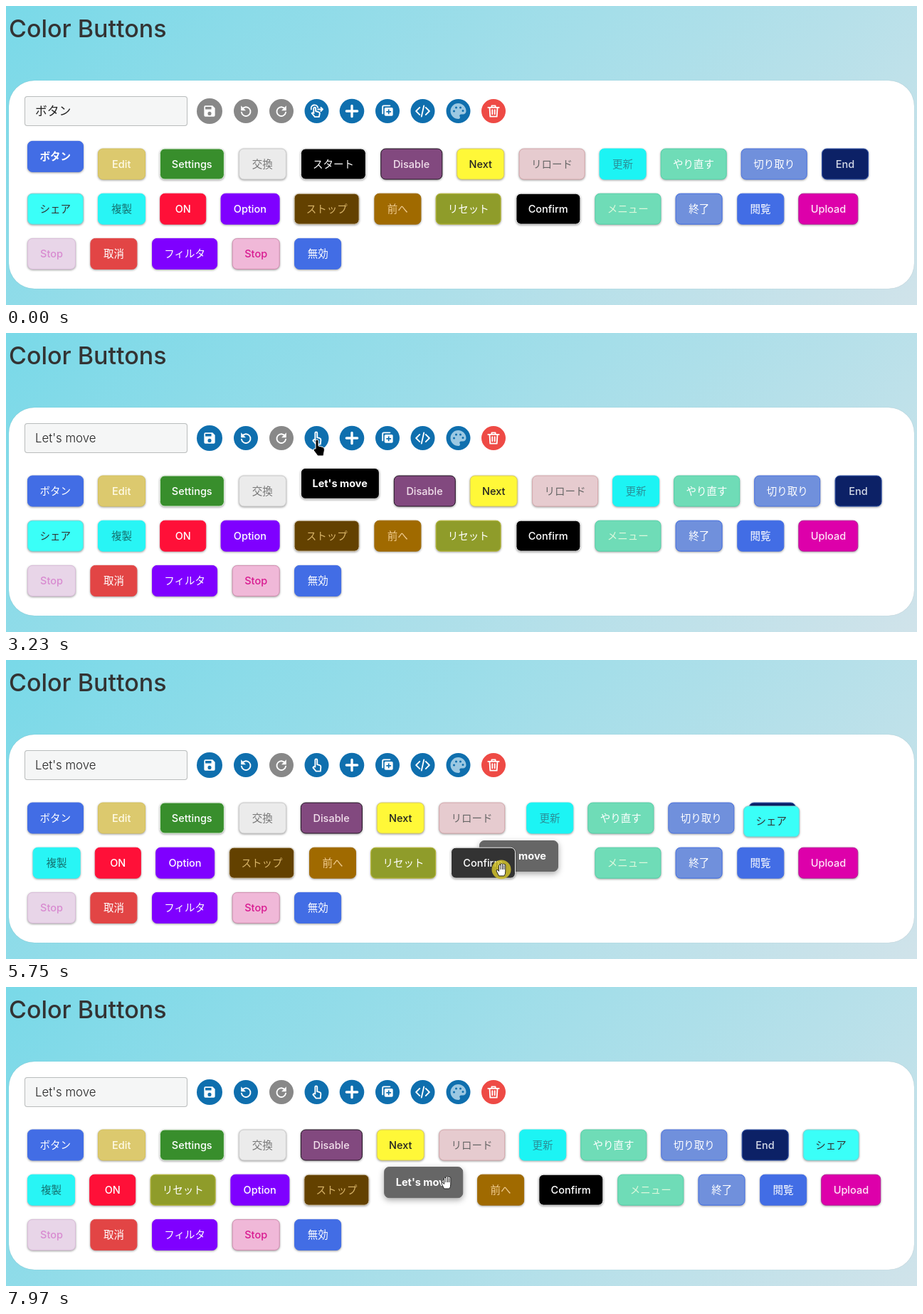
An HTML page that plays this animation: 1280 px wide and 421 px high, repeating every 8 s.

```html
<!DOCTYPE html>
<html lang="ja">
<head>
<meta charset="utf-8">
<title>Color Buttons</title>
<style>
  html, body { margin: 0; width: 100%; height: 100%; overflow: hidden; }
  body { position: relative; background: linear-gradient(135deg, #79d9e8, #d0e3ea);
    font-family: Inter, "Noto Sans CJK JP", sans-serif; }
  body > *, .button { position: absolute; box-sizing: border-box; }
  h1 { left: 4px; top: 11px; margin: 0; font: 500 34px/42px Inter, sans-serif; color: #333; }
  #panel { left: 4px; top: 104.5px; width: 1271.5px; height: 293px; border-radius: 36px;
    background: #fff; box-shadow: 0 0 1px rgba(0, 0, 0, .2); }
  #field { left: 26px; top: 127px; width: 229px; height: 42px; border-radius: 4px; background: #f5f6f6;
    box-shadow: inset 0 0 0 1px #b9bcbc; padding-left: 15px; font-size: 16.8px; font-weight: 300;
    line-height: 43px; color: #222; white-space: pre; }
  #field.focus { box-shadow: inset 0 0 0 2px #1b75c4; }
  #field.focus::after { content: ""; display: inline-block; width: 1px; height: 19px;
    background: #111; vertical-align: -4px; }
  svg { left: 0; top: 0; width: 1280px; height: 421px; }
  #cursor { z-index: 5; }
  .button { left: 0; top: 0; height: 44px; border: 1px solid; border-radius: 7px; font-size: 14.5px;
    font-weight: 500; line-height: 41px; text-align: center; white-space: pre;
    box-shadow: 0 1px 3px rgba(0, 0, 0, .38); }
  .button.selected { font-weight: 700; }
  .button.lifted { box-shadow: 0 3px 8px rgba(0, 0, 0, .35); }
</style>
</head>
<body>
<h1>Color Buttons</h1>
<div id="panel"></div>
<div id="field"></div>
<svg id="toolbar"></svg>
<div id="buttons"></div>
<svg id="cursor"></svg>
<script>
const STEP = 101, LOOP = 8000;      // the picture advances in steps of about 0.1 s
const RENAMED = 4, TYPED = "Let's move";
const GREY = '#888', BLUE = '#0f6fae', RED = '#ee4a45';
const $ = id => document.getElementById(id);

// label, width, background, text, border
const BUTTONS = [
  ['ボタン', 78.6, '#426de5', '#fff'],
  ['Edit', 66.5, '#dcc96e', '#fffbe8', '#d6c25c'],
  ['Settings', 90.7, '#388e2c', '#fff', '#e2f2df'],
  ['交換', 66.5, '#ebebeb', '#777', '#ccc'],
  ['スタート', 92, '#000', '#fff', '#eee'],
  ['Disable', 86.5, '#82497f', '#f2e0ec', '#221522'],
  ['Next', 67, '#fff838', '#222', '#d8cc60'],
  ['リロード', 92.6, '#e6cbcf', '#666', '#d6a8ac'],
  ['更新', 65.7, '#1cf4f4', '#2a8f98'],
  ['やり直す', 92.6, '#6fdcb7', '#fff', '#52d2a8'],
  ['切り取り', 93, '#7090dc', '#fff', '#4a72e0'],
  ['End', 65.6, '#0c2166', '#d5dbe8', '#2a4ea8'],
  ['シェア', 78.6, '#3afff8', '#333', '#72d4d4'],
  ['複製', 66.8, '#28f5f5', '#14706f'],
  ['ON', 65, '#ff1038', '#fff'],
  ['Option', 82.6, '#7f00ff', '#fff'],
  ['ストップ', 92.4, '#634100', '#d8b468', '#d8cdb8'],
  ['前へ', 65.8, '#a06a00', '#f0cc90'],
  ['リセット', 92.4, '#8f9c2a', '#fff', '#b8b934'],
  ['Confirm', 90.6, '#000', '#fff', '#eee'],
  ['メニュー', 92.8, '#6fdcb7', '#dcf8dc', '#52d2a8'],
  ['終了', 66.3, '#7090dc', '#fff', '#3f6ce4'],
  ['閲覧', 65.6, '#426de5', '#fff'],
  ['Upload', 84.4, '#dd00aa', '#ffe6f8', '#b81898'],
  ['Stop', 68, '#e8d5e8', '#d88ad0', '#d8bcd8'],
  ['取消', 66.3, '#e24545', '#fff'],
  ['フィルタ', 92.2, '#7f00ff', '#fff'],
  ['Stop', 67, '#f0b8d8', '#d81890', '#cf8cae'],
  ['無効', 66.3, '#426de5', '#fff'],
];

// Reordering: step, button, new index. A repeated index is a drop, which reflows every button.
const MOVES = [
  [43.5, 4, 5], [44.5, 4, 6], [45.7, 4, 7], [55.85, 4, 19],
  [58.5, 4, 18], [59.5, 4, 17], [60.5, 4, 16], [62, 4, 16],
  [69, 18, 17], [70, 18, 16], [71.5, 18, 15], [72.5, 18, 14], [74, 18, 14],
];
const DRAGS = [
  { id: 4, from: 42, to: 62, path: [[42, 414, 190], [47, 716, 195], [51, 750, 205],
    [54, 722, 235], [57, 665, 254], [62, 425, 262]] },
  { id: 18, from: 68, to: 74, path: [[68, 637, 264], [74, 205, 268]] },
];
const CURSOR_PATH = [
  [1, 805, 335, 'arrow'], [7, 462, 222, 'pointer'], [9, 462, 222, 'arrow'], [14, 140, 150, 'text'],
  [20, 140, 150, 'arrow'], [24, 503, 159, 'pointer'], [26, 503, 159, 'pointer'],
  [30, 436, 150, 'pointer'], [34, 438, 152, 'grab'], [39, 461, 218, 'grab'], [42, 461, 218, 'grab'],
  [47, 773, 225, 'grab'], [51, 800, 232, 'grab'], [54, 760, 275, 'grab'], [57, 696, 295, 'grab'],
  [61, 480, 300, 'grab'], [62, 474, 302, 'arrow'], [64, 469, 304, 'arrow'], [68, 683, 285, 'grab'],
  [73, 250, 287, 'grab'], [74, 250, 287, 'grab'], [79, 619, 275, 'grab'],
];
const PRESSES = [[8, 10], [15, 16], [31, 32], [42, 62], [68, 74]];

// shape, fill, outline
const CURSORS = {
  arrow: ['M0 0v17l4-4 3 7 3-1.3-3-6.7h5.5z', '#000', '#fff'],
  pointer: ['M-2 1a2 2 0 0 1 4 0v7l6 1.5q3 1 2.4 4.5l-1.4 8h-8l-6-8q0-3 3-2z', '#000', '#fff'],
  text: ['M-3-8h6M0-8V8M-3 8h6', 'none', '#222'],
  grab: ['M-3.5 9L-7 2q0-2.5 2-1.5l1.5 2V-6q1.5-2 2.5 0 0-4 2.5-1.5 1-1.5 2 .5 2-1.5 2.3 1V3q0 4-2 6zM-1-6v6M1.5-7v7M3.7-6v6',
    '#fff', '#222'],
};

const dot = (x, y) => `M${x - 1.5} ${y}a1.5 1.5 0 1 0 3 0a1.5 1.5 0 1 0-3 0z`;
const ICONS = {
  save: { fill: 'M17 3H5a2 2 0 0 0-2 2v14a2 2 0 0 0 2 2h14a2 2 0 0 0 2-2V7zM12 19a3 3 0 1 1 0-6 3 3 0 0 1 0 6zM15 9H5V5h10z' },
  undo: { fill: 'M4 3v8h8z', line: 'M6 8.5A7.5 7.5 0 1 1 4.8 14' },
  redo: { fill: 'M20 3v8h-8z', line: 'M18 8.5A7.5 7.5 0 1 0 19.2 14' },
  swipe: { line: 'M7 15V7.5a1.7 1.7 0 0 1 3.4 0V12l5 1.5q2 .6 1.6 3l-1 5h-7l-5-6q1.5-1.5 3.5 0' +
    'M3 9a5.5 5.5 0 0 1 11-3M14 9h8M19 6l3 3-3 3' },
  touch: { line: 'M9.5 15V3.5a1.7 1.7 0 0 1 3.4 0V11l4 1.2q2.2 .8 2 3l-.7 7h-7.2l-5-6q1-2.5 3.5-1.2' },
  add: { line: 'M12 3v18M3 12h18', weight: 4 },
  copy: { fill: 'M9 6h10a2 2 0 0 1 2 2v10a2 2 0 0 1-2 2H9a2 2 0 0 1-2-2V8a2 2 0 0 1 2-2zM13 9h2v3h3v2h-3v3h-2v-3h-3v-2h3z',
    line: 'M4 16V5a2 2 0 0 1 2-2h10' },
  code: { line: 'M7 6l-6 6 6 6M17 6l6 6-6 6M14 3l-4 18' },
  palette: { fill: 'M12 1a11 11 0 0 0 0 22c2.5 0 3-2 2-3.5-.8-1.6.2-3 2-3h2.5a4.5 4.5 0 0 0 4.5-4.5c0-6-5-11-11-11z' +
    dot(6, 12) + dot(9, 7) + dot(15, 7) + dot(18.5, 11.5), ink: '#9cc8e2', scale: 1 },
  trash: { line: 'M3 6h18M9 6V3h6v3M5.5 6l1 15h11l1-15M10 10v7M14 10v7' },
};

const clamp = v => Math.max(0, Math.min(1, v));
const easeOut = v => 1 - (1 - clamp(v)) ** 3;
const mix = (a, b, w) => a.map((v, i) => v + (b[i] - v) * w);
const within = (k, [from, to]) => k >= from && k < to;

function along(path, k) {
  const next = path.findIndex(p => p[0] > k);
  if (next < 0) return path[path.length - 1].slice(1, 3);
  if (next === 0) return path[0].slice(1, 3);
  const a = path[next - 1], b = path[next];
  return mix(a.slice(1, 3), b.slice(1, 3), (k - a[0]) / (b[0] - a[0]));
}

const orders = [BUTTONS.map((_, i) => i)];
for (const [, id, index] of MOVES) {
  const order = orders[orders.length - 1].filter(i => i !== id);
  order.splice(index, 0, id);
  orders.push(order);
}

function layout(order, widths) {
  const spots = [];
  let x = 30, y = 200.5;
  for (const id of order) {
    if (x + widths[id] > 1250) { x = 30; y += 63.2; }
    spots[id] = [x, y];
    x += widths[id] + 20.4;
  }
  return spots;
}

function flowPosition(id, k, layouts) {
  let p = layouts[0][id];
  MOVES.forEach(([start, moved], i) => {
    const shifts = j => orders[i].indexOf(j) !== orders[i + 1].indexOf(j);
    if (shifts(id) || !shifts(moved)) p = mix(p, layouts[i + 1][id], easeOut((k - start) / 2));
  });
  return p;
}

function icon(name, x, color, radius = 17) {
  const { fill = '', line = '', ink = '#fff', weight = 2.2, scale = .85 } = ICONS[name];
  return `<circle cx="${x}" cy="148" r="${radius}" fill="${color}"/>
    <g transform="translate(${x} 148) scale(${scale}) translate(-12 -12)"
      stroke-linecap="round" stroke-linejoin="round">
    <path d="${fill}" fill="${ink}" fill-rule="evenodd"/>
    <path d="${line}" fill="none" stroke="${ink}" stroke-width="${weight}"/></g>`;
}

function drawToolbar(k) {
  const edited = k >= 18 ? BLUE : GREY, hover = within(k, [24, 27]);
  $('toolbar').innerHTML = (hover ? '<circle cx="486" cy="148" r="21" fill="#f2f2f2"/>' : '') +
    icon('save', 286, edited, 18) + icon('undo', 337, edited) + icon('redo', 387, GREY) +
    icon(k < 31 ? 'swipe' : 'touch', 436.5, BLUE) + icon('add', 486, BLUE, hover ? 17.8 : 17.3) +
    icon('copy', 536, BLUE) + icon('code', 585.5, BLUE) + icon('palette', 635.5, BLUE) +
    icon('trash', 685, RED);
}

function drawCursor(k, [x, y], kind) {
  const [shape, fill, stroke] = CURSORS[kind];
  const pressed = PRESSES.some(p => within(k, p));
  $('cursor').innerHTML = k < 1 ? '' : `<g transform="translate(${x} ${y})">
    ${pressed ? '<circle r="13.5" fill="#d2c22c" fill-opacity=".85"/>' : ''}
    <path d="${shape}" fill="${fill}" stroke="${stroke}"/></g>`;
}

const elements = BUTTONS.map(([label, , background, color, borderColor = background]) => {
  const el = document.createElement('div');
  el.className = 'button';
  el.textContent = label;
  Object.assign(el.style, { background, color, borderColor });
  return $('buttons').appendChild(el);
});

function drawButtons(k, label, cursor, kind) {
  const selected = k < 9 ? 0 : RENAMED;
  const widths = BUTTONS.map(b => b[1]);
  if (k >= 18) widths[RENAMED] = Math.max(66, 34 + 7.65 * label.length);
  const layouts = orders.map(order => layout(order, widths));
  const active = DRAGS.find(d => within(k, [d.from, d.to]));
  const canHover = k >= 1 && (kind === 'grab' || kind === 'pointer');
  elements[RENAMED].textContent = label;

  elements.forEach((el, id) => {
    let [x, y] = flowPosition(id, k, layouts);
    const moving = Math.hypot(x - flowPosition(id, k + 1, layouts)[0]) > .5;
    if (id === selected) y -= 10.6;
    const drag = DRAGS.find(d => d.id === id && k >= d.from);
    if (drag) [x, y] = mix(along(drag.path, Math.min(k, drag.to)), [x, y], easeOut((k - drag.to) / 2));
    const dragged = active && active.id === id;
    const hovered = canHover && within(cursor[0], [x, x + widths[id]]) && within(cursor[1], [y, y + 44]);
    const strength = dragged || hovered && !active ? 60 : hovered ? 80 : 100;
    const shade = color => `color-mix(in srgb, ${color} ${strength}%, white)`;
    const [, , background, , border = background] = BUTTONS[id];
    el.classList.toggle('selected', id === selected);
    el.classList.toggle('lifted', strength === 60);
    Object.assign(el.style, {
      width: widths[id] + 'px',
      transform: `translate(${x}px, ${y}px)`,
      background: shade(background),
      borderColor: strength === 60 ? shade(background) : border,
      zIndex: dragged ? 1 : moving ? 2 : 0,
    });
  });
}

let shown = -1;
function frame(now) {
  const k = Math.floor((now % LOOP) / STEP + .16);
  if (k !== shown) {
    shown = k;
    const label = k < 18 ? BUTTONS[RENAMED][0] : TYPED.slice(0, (k - 17) * 2);
    const cursor = along(CURSOR_PATH, k);
    const kind = (CURSOR_PATH.filter(p => p[0] <= k).pop() || CURSOR_PATH[0])[3];
    $('field').textContent = k < 9 ? BUTTONS[0][0] : label;
    $('field').classList.toggle('focus', within(k, [15, 31]));
    drawToolbar(k);
    drawButtons(k, label, cursor, kind);
    drawCursor(k, cursor, kind);
  }
  requestAnimationFrame(frame);
}
requestAnimationFrame(frame);
</script>
</body>
</html>
```
